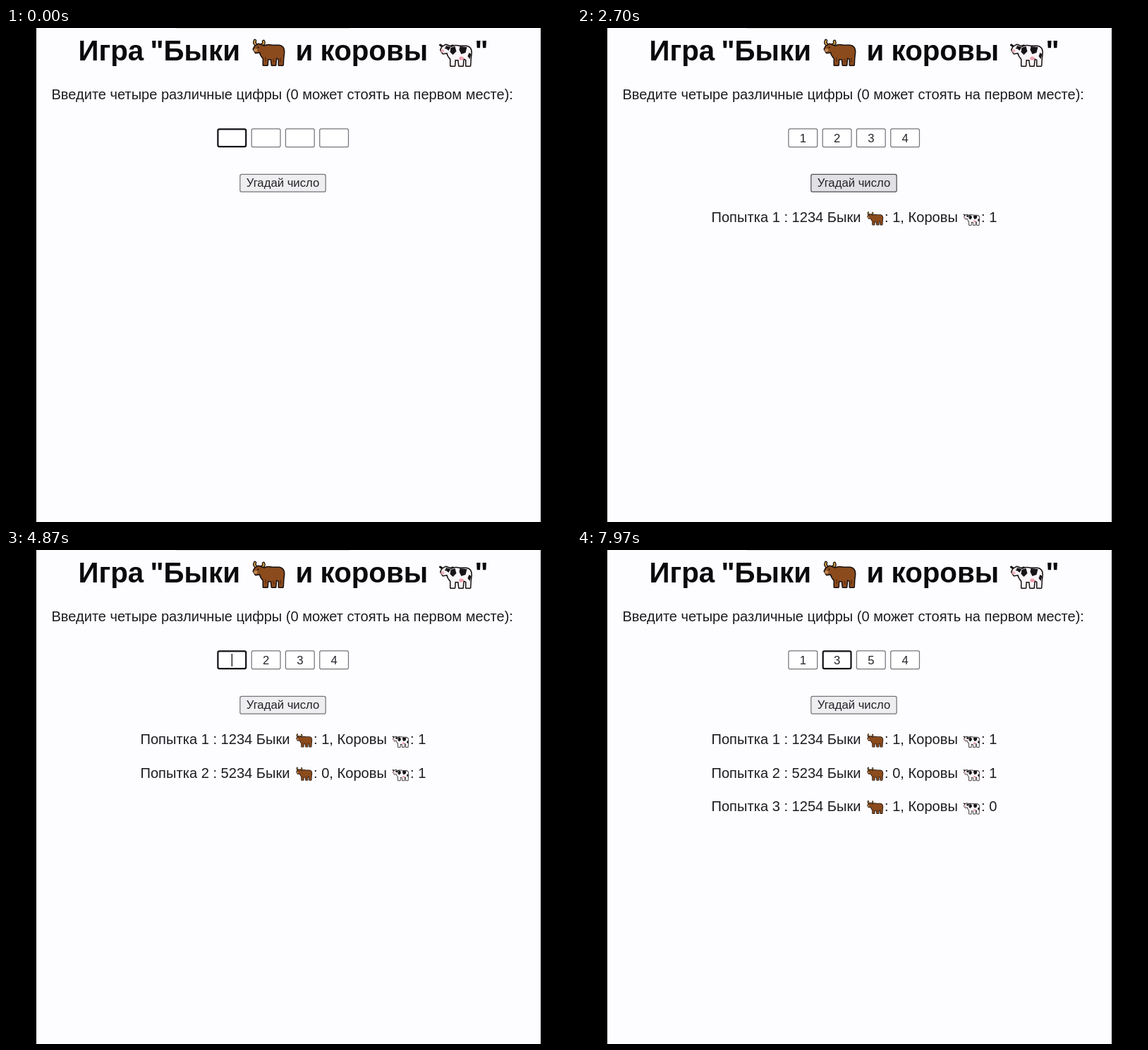
These frames come from a looping animation (801 px wide and 700 px high, 8 s). An HTML page with a canvas:

```html
<!DOCTYPE html>
<html lang="ru">
<head>
<meta charset="utf-8">
<title>Быки и коровы</title>
<style>
html, body { margin: 0; width: 100%; height: 100%; overflow: hidden; background: #000; }
canvas { display: block; width: 801px; height: 700px; }
</style>
</head>
<body>
<canvas id="stage" width="801" height="700"></canvas>
<script>
const ctx = document.getElementById('stage').getContext('2d');
const LOOP = 8000;
const FONT = '"Liberation Sans", Arial, sans-serif';
const BOX_X = [299.3, 347.6, 395.8, 444.1];

// Each track holds [start time, value] steps.
const digitSteps = [
  [0, '    '], [700, '1   '], [1050, '12  '], [1350, '123 '], [1650, '1234'],
  [3080, ' 234'], [3250, '5234'],
  [4720, ' 234'], [4880, '1234'],
  [5700, '12 4'], [5850, '1254'],
  [7600, '1 54'], [7800, '1354']
];
// -1 means that no input has the focus.
const focusSteps = [
  [-500, 0], [750, 1], [1100, 2], [1400, 3], [2330, -1],
  [2900, 0], [3850, -1], [4500, 0], [5350, 2], [6270, -1], [7000, 1]
];
const hoverSteps = [
  [0, false], [2200, true], [2800, false], [3700, true],
  [4300, false], [6130, true], [6830, false]
];
const tries = [
  [2350, '1234', 1, 1],
  [3870, '5234', 0, 1],
  [6290, '1254', 1, 0]
];

function stepAt(steps, t) {
  let found = steps[0];
  for (const s of steps) if (s[0] <= t) found = s;
  return found;
}

// Places the visible left edge of the text at x.
function inkText(str, x, y, size, color = '#1d1c20', weight = 'normal') {
  ctx.font = `${weight} ${size}px ${FONT}`;
  ctx.textAlign = 'left';
  ctx.fillStyle = color;
  ctx.fillText(str, x + ctx.measureText(str).actualBoundingBoxLeft, y);
}

function centerText(str, x, y, size) {
  ctx.font = `${size}px ${FONT}`;
  ctx.textAlign = 'center';
  ctx.fillStyle = '#242328';
  ctx.fillText(str, x, y);
}

function panel(x, y, w, h, fill, border, line) {
  ctx.beginPath();
  ctx.roundRect(x + line / 2, y + line / 2, w - line, h - line, 2.2);
  ctx.fillStyle = fill;
  ctx.fill();
  ctx.lineWidth = line;
  ctx.strokeStyle = border;
  ctx.stroke();
}

const bodyPath = new Path2D('M2 14L4 10L9 7L17 10Q22 7 28 9L38 9Q45 10 45 18L44 27L43.5 36.5L38 36.5L38 28L34 26L33 36.5L28 36.5L27 28L22 28L21.5 36.5L16 36.5L16 27Q12 23 11 18L5 19Z');
const hornPath = new Path2D('M6 8Q2 6 4 2M13 8Q18 7 16 3');
const earPath = new Path2D('M4 9L1 7M14 10L19 8');
const legPath = new Path2D('M19 26L19 31M30 28L31 32M40 27L40 32');
const patchPath = new Path2D('M16 11L22 9L24 16L19 21L15 17ZM29 9L39 10L37 18L31 20L28 14ZM42 18L45 20L43 27L40 23Z');
const headPatch = new Path2D('M9 8L16 10L13 15L9 12Z');

function stroke(path, color, width) {
  ctx.strokeStyle = color;
  ctx.lineWidth = width;
  ctx.stroke(path);
}

function fill(path, color) {
  ctx.fillStyle = color;
  ctx.fill(path);
}

function dot(x, y, rx, ry, color) {
  ctx.beginPath();
  ctx.ellipse(x, y, rx, ry, 0, 0, Math.PI * 2);
  ctx.fillStyle = color;
  ctx.fill();
}

function animal(x, y, scale, cow) {
  ctx.save();
  ctx.translate(x, y);
  ctx.scale(scale, scale);
  ctx.lineJoin = ctx.lineCap = 'round';
  if (cow) {
    stroke(earPath, '#111', 3);
  } else {
    stroke(hornPath, '#17100b', 4.6);
    stroke(hornPath, '#d9a449', 2);
  }
  stroke(bodyPath, '#17100f', 3);
  fill(bodyPath, cow ? '#f8f6f8' : '#8b4b1d');
  if (cow) {
    fill(patchPath, '#161416');
    fill(headPatch, '#161416');
    dot(31, 26, 3.3, 2.6, '#ef9fae');
    dot(4.5, 15.5, 2.4, 2.4, '#efb3bd');
  } else {
    stroke(legPath, '#6b3512', 2);
    dot(4.8, 15.5, 2.6, 2.3, '#c08b58');
  }
  dot(8.5, 11.5, 1, 1, '#111');
  ctx.restore();
}

function heading() {
  const word = (s, x) => inkText(s, x, 46, 40.3, '#0a090c', 'bold');
  word('Игра', 104.5);
  word('"Быки', 206.5);
  animal(349, 16, 1, false);
  word('и', 412.5);
  word('коровы', 447.5);
  animal(614.5, 17, 1, true);
  word('"', 666.5);
}

function form(t) {
  const digits = stepAt(digitSteps, t)[1];
  const [since, focus] = stepAt(focusSteps, t);
  BOX_X.forEach((x, i) => {
    const on = i === focus;
    const mid = x + 21;
    const digit = digits[i].trim();
    panel(x, 142.3, 42, 27, '#fff', on ? '#111014' : '#77757a', on ? 2.2 : 1.25);
    centerText(digit, mid, 161.7, 16.7);
    if (on && (t - since) % 1000 < 500) {
      ctx.fillStyle = '#111';
      ctx.fillRect(mid + (digit ? 4.6 : -0.6), 147, 1.3, 18);
    }
  });
  const hover = stepAt(hoverSteps, t)[1];
  panel(331.2, 206.8, 122.6, 26, hover ? '#e1e0e4' : '#eeedf0', hover ? '#504f54' : '#77757a', 1.25);
  centerText('Угадай число', 392.5, 225, 16.7);
}

function resultRow(index, [, guess, bulls, cows]) {
  const y = 275.4 + index * 47.3;
  inkText(`Попытка ${index + 1} : ${guess} Быки`, 191.5, y, 20.1);
  animal(411, y - 15, 0.5, false);
  inkText(`: ${bulls}, Коровы`, 437, y, 20.1);
  animal(548, y - 14.5, 0.5, true);
  inkText(`: ${cows}`, 574, y, 20.1);
}

function draw(t) {
  ctx.fillStyle = '#000';
  ctx.fillRect(0, 0, 801, 700);
  ctx.fillStyle = '#fdfcff';
  ctx.fillRect(43, 0, 715, 700);
  ctx.fillStyle = '#d9d7db';
  ctx.fillRect(241, 0, 246, 0.8);
  heading();
  inkText('Введите четыре различные цифры (0 может стоять на первом месте):', 65.5, 101, 20.06);
  form(t);
  tries.forEach((row, i) => { if (t >= row[0]) resultRow(i, row); });
}

const begin = performance.now();
function tick() {
  draw((performance.now() - begin) % LOOP);
  requestAnimationFrame(tick);
}
tick();
</script>
</body>
</html>
```
